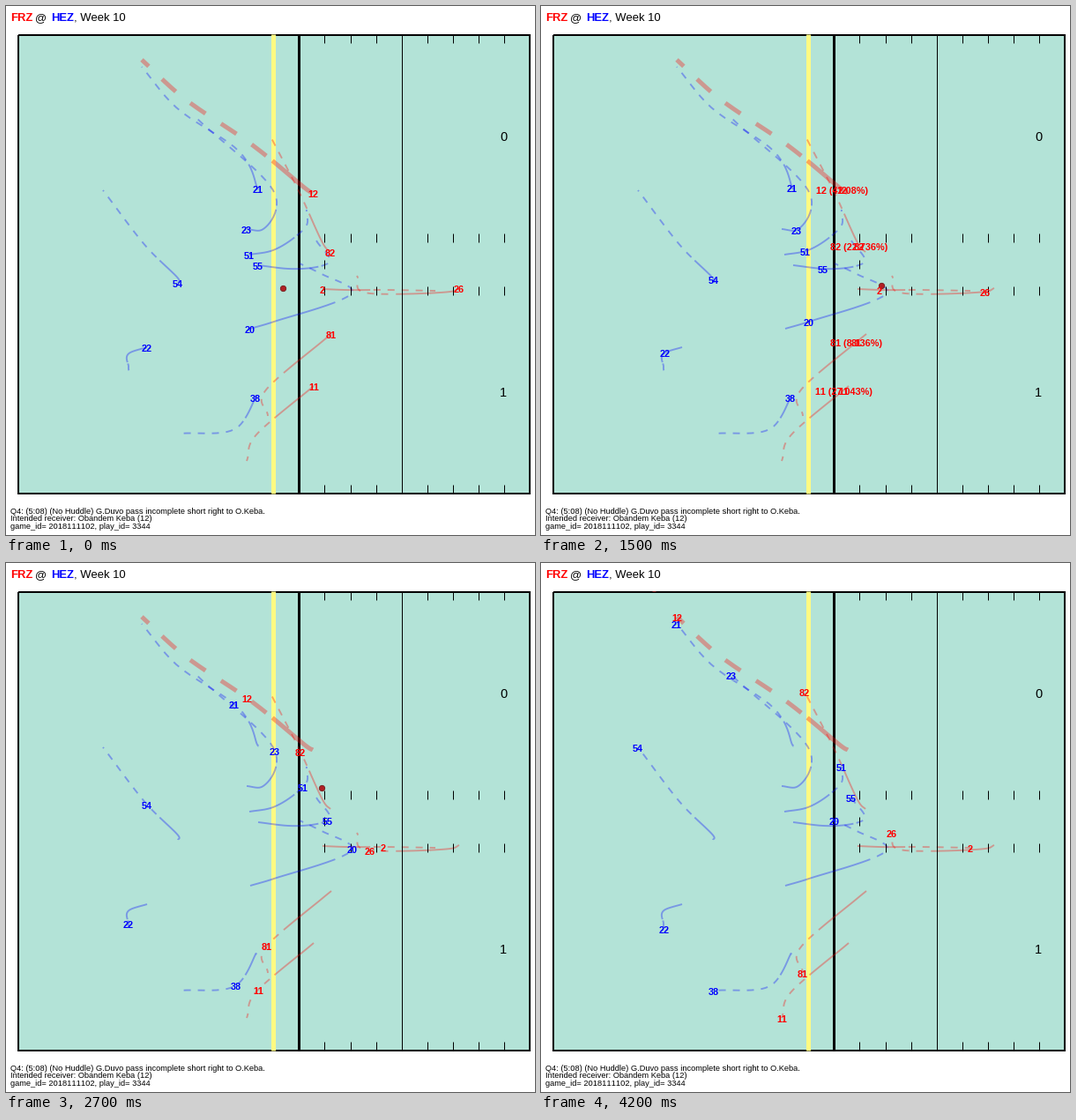
A matplotlib script that plays this animation: 600 px wide and 600 px high, repeating every 5300 ms.

```python
import numpy as np
import matplotlib.pyplot as plt
from matplotlib.animation import FuncAnimation
from matplotlib.patches import Rectangle

SIZE, DPI = 600, 100
PX = 72 / DPI                      # points per pixel
FRAMES, LAST, SNAP, THROW = 53, 42, 10, 23
YARD, GOAL = 29.1, 331.85          # tick spacing and goal line in pixels

plt.rcParams.update({"font.family": "Liberation Sans", "text.kerning_factor": 6})
fig = plt.figure(figsize=(SIZE / DPI, SIZE / DPI), dpi=DPI, facecolor="white")
ax = fig.add_axes([0, 0, 1, 1])
ax.set(xlim=(0, SIZE), ylim=(SIZE, 0))
ax.axis("off")


def clock(frame):
    """Running time: almost still before the snap, then steady."""
    return 2.5 * np.log1p(np.exp((np.asarray(frame) - 9) / 2.5))


def run(points):
    """Smooth route through waypoints, one position per frame."""
    keys = (0, 15, 27, 42) if len(points) == 4 else (0, 15, 27, 35, 42)
    k, s, p = clock(keys), clock(np.arange(LAST + 1)), np.array(points, float)
    slope = np.gradient(p, k, axis=0)
    i = np.clip(np.searchsorted(k, s, "right") - 1, 0, len(k) - 2)
    h = (k[i + 1] - k[i])[:, None]
    t = (s - k[i])[:, None] / h
    ease = t * t * (3 - 2 * t)
    return (p[i] + ease * (p[i + 1] - p[i])
            + h * t * (1 - t) * ((1 - t) * slope[i] - t * slope[i + 1]))


def line(xs, ys, width, color="black", z=2, **kw):
    return ax.plot(xs, ys, color=color, lw=width * PX, zorder=z,
                   solid_capstyle="butt", **kw)[0]


def write(x, y, text, size, color="black", **kw):
    return ax.text(x, y, text, fontsize=size * PX, color=color,
                   va="baseline", **kw)


def tick(yards, y):
    x = int(GOAL + YARD * yards) + 0.5
    line([x, x], [y, y + 10], 1, z=4)


def draw_field():
    left, right, top, bottom = 14, 594, 33, 553
    ax.add_patch(Rectangle((left, top), right - left, bottom - top,
                           fc="#b3e3d7", ec="none", zorder=1))
    line([left, right, right, left, left], [top, top, bottom, bottom, top], 2,
         solid_joinstyle="miter")
    for yards, width, color in ((-1, 5, "#fffa82"), (0, 3, "black"), (4, 1, "black")):
        x = int(GOAL + YARD * yards) + 0.5
        line([x, x], [32, bottom], width, color)
    for yards in range(1, 9):
        for y in (top - 1, 258, 318, bottom - 10):
            tick(yards, y)
    tick(1, 288)
    write(564, 153, "0", 14.5, ha="center")
    write(564, 443, "1", 14.5, ha="center")


def draw_captions():
    write(5, 17, "FRZ", 13, "red", weight="bold")
    write(33.5, 17, "@", 13)
    write(51, 17, "HEZ", 13, "blue", weight="bold")
    write(77, 17, ", Week 10", 13)
    rows = ("Q4: (5:08) (No Huddle) G.Duvo pass incomplete short right to O.Keba.",
            "Intended receiver: Obandem Keba (12)",
            "game_id= 2018111102, play_id= 3344")
    for k, row in enumerate(rows):
        write(5, 576 + 8.5 * k, row, 9.25)


class Player:
    def __init__(self, number, color, *points, width=1.9, odds=None, digits=3):
        self.number, self.odds, self.digits = number, odds, digits
        self.spots = run(points)
        x, y = self.spots.T
        for part, style in ((slice(0, THROW + 1), "-"),
                            (slice(THROW + 1, None), (0, (4.2, 4.2)))):
            line(x[part], y[part] - 2, width, color, z=3, alpha=0.33,
                 linestyle=style)
        style = dict(ha="center", weight="bold", zorder=6)
        self.label = write(0, 0, number, 10.9, color, **style)
        self.chance = write(0, 0, "", 10.9, color, **style)

    def weight(self, i):
        """Unscaled catch chance, changing at a constant rate."""
        early, late = self.odds
        return early * (late / early) ** ((i - 15) / 4)

    def move(self, i, total):
        x, y = self.spots[i]
        for text in (self.label, self.chance):
            text.set_position((x, y + 3.4))
        shown = ""
        if self.odds and SNAP < i <= THROW:
            percent = 100 * self.weight(i) / total
            shown = f"{self.number} ({percent:.{self.digits}f}%)"
        self.chance.set_text(shown)


draw_field()
draw_captions()

players = [
    Player("21", "blue", (286, 209), (285, 208), (259, 162), (193, 117), (154, 71)),
    Player("23", "blue", (273, 255), (290, 256), (305, 215), (216, 129)),
    Player("51", "blue", (276, 284), (300, 280), (337, 256), (341, 233)),
    Player("55", "blue", (286, 296), (320, 300), (365, 294), (352, 268)),
    Player("20", "blue", (277, 368), (304, 360), (393, 326), (358, 306), (333, 294)),
    Player("54", "blue", (195, 316), (196, 312), (160, 276), (110, 211)),
    Player("22", "blue", (160, 389), (141, 395), (139, 411), (140, 417)),
    Player("38", "blue", (283, 446), (283, 446), (261, 481), (196, 487)),
    Player("2", "red", (359, 323), (384, 324), (428, 324), (487, 325)),
    Player("26", "red", (514, 322), (504, 326), (413, 328), (398, 308)),
    Player("12", "red", (348, 214), (341, 210), (273, 155), (201, 106), (154, 63),
           width=5, odds=(42.0849, 36.882), digits=2),
    Player("82", "red", (368, 281), (361, 274), (334, 216), (299, 148),
           odds=(22.736, 27.942)),
    Player("81", "red", (369, 374), (358, 383), (296, 436), (297, 467),
           odds=(8.136, 21.026)),
    Player("11", "red", (349, 433), (343, 438), (286, 486), (273, 518),
           odds=(27.043, 14.15)),
]
receivers = [p for p in players if p.odds]

# Ball: snapped, carried, then thrown out of bounds.
ball_path = np.array([(SNAP, 314, 320), (15, 386, 317), (19, 416, 321),
                      (THROW, 424, 319), (35, 224, 127), (LAST, 128, 29)])
ball, = ax.plot([], [], "o", ms=6.4 * PX, mfc="#b02025", mec="#701818",
                mew=0.8 * PX, zorder=5)
ball.set_clip_path(Rectangle((13, 32), 583, 522, transform=ax.transData))


def update(frame):
    i = min(frame, LAST)
    total = sum(p.weight(i) for p in receivers)
    for player in players:
        player.move(i, total)
    when, xs, ys = ball_path.T
    ball.set_data([np.interp(i, when, xs) + 0.3], [np.interp(i, when, ys) + 0.3])
    return []


anim = FuncAnimation(fig, update, frames=FRAMES, interval=100,
                     repeat=True, repeat_delay=0, blit=False)
plt.show()
```
